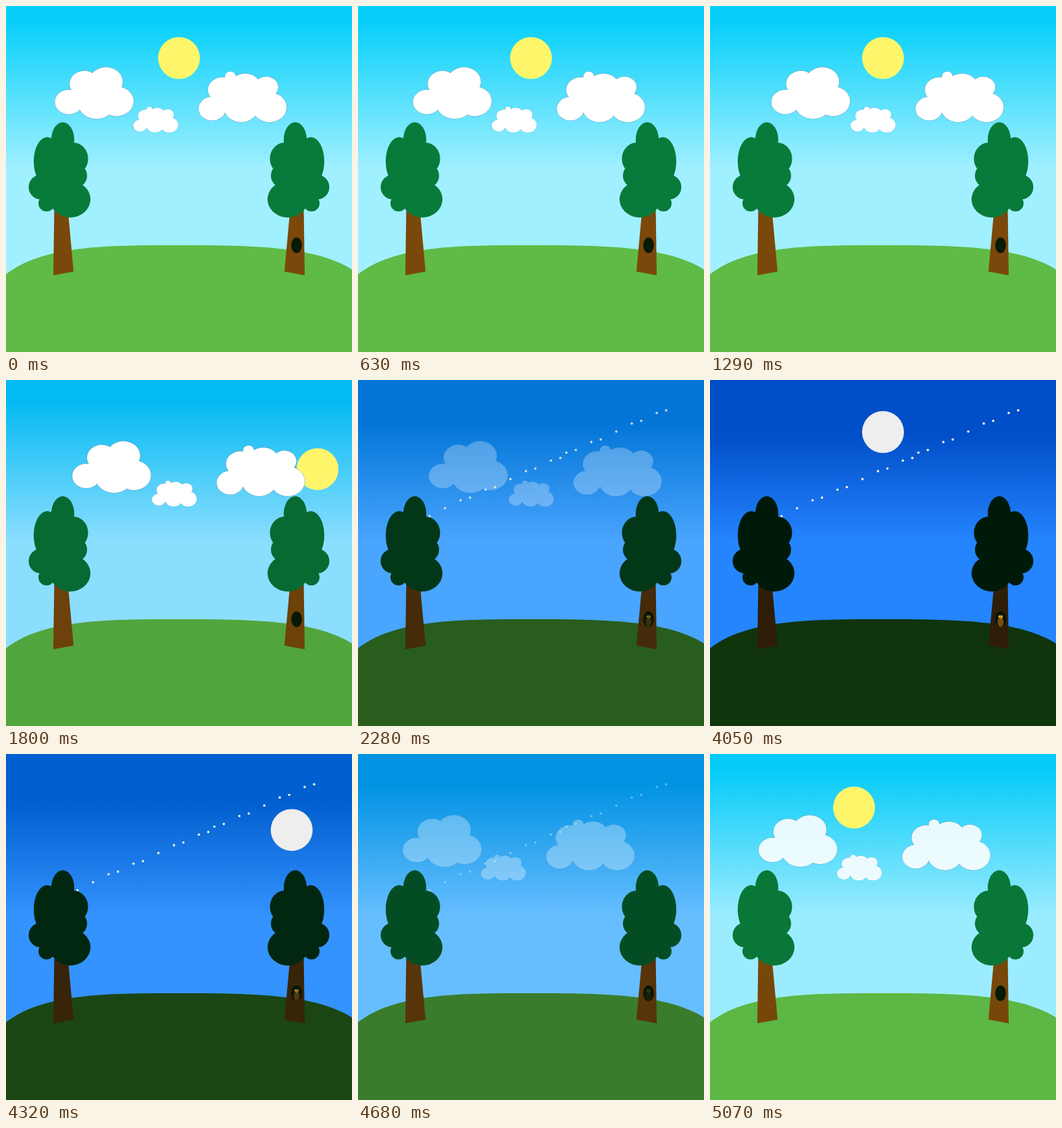
Animation of 512x512 px, one loop 5.1 s. Source, as an HTML page with a canvas:

```html
<!DOCTYPE html>
<html lang="en">
<head>
<meta charset="utf-8">
<title>Day and night</title>
<style>
  html, body { margin: 0; width: 100%; height: 100%; overflow: hidden; }
  canvas { display: block; width: 100%; height: 100%; }
</style>
</head>
<body>
<canvas id="stage" width="512" height="512"></canvas>
<script>
const LOOP = 5100, STEP = 30, SIZE = 512;
const DUSK = 1650, DAWN = 4200, TURN = 900;
const ctx = document.getElementById('stage').getContext('2d');

// Separate layer so outlined clouds fade as one picture
const layer = document.createElement('canvas');
layer.width = layer.height = SIZE;
const cloudCtx = layer.getContext('2d');

// [day, night]
const COLORS = {
  skyTop: ['05cffa', '004ec8'],
  skyLow: ['a0f0ff', '2585ff'],
  grass: ['5fbb46', '10340c'],
  leaves: ['087a3a', '001a0a'],
  trunk: ['7a480a', '2e1e08'],
  hole: ['081a05', '021406']
};

// Lobes run clockwise: x, y, radius x, radius y
const CROWN = [
  [84, 198, 17, 26], [99, 226, 22.5, 24], [102, 251, 18, 18], [95, 286, 30, 27],
  [60, 292, 12, 12], [51, 268, 17.5, 18], [61, 230, 20, 36]
];
// Cloud puffs: x, y, radius, all slightly wide
const puff = ([x, y, r]) => [x, y, r * 1.15, r];
const ROUND = [
  [93, 142, 18], [116, 115, 19], [148, 112, 21.5], [163.5, 141, 22], [134, 143, 24]
].map(puff);
const LONG = [
  [305, 152, 17.5], [320, 124, 18.5], [332, 104, 7], [354, 120, 20],
  [385, 120, 15.5], [390, 150, 22], [348, 150, 22]
].map(puff);

const ramp = (t, from, length) => Math.min(1, Math.max(0, (t - from) / length));
const frac = v => v - Math.floor(v);

function tint(name, night) {
  const channel = (hex, i) => parseInt(hex.substr(i * 2, 2), 16);
  const [day, dark] = COLORS[name];
  const mix = i => Math.round(channel(day, i) * (1 - night) + channel(dark, i) * night);
  return `rgb(${[0, 1, 2].map(mix)})`;
}

// Ellipses joined by the polygon through their centres
function lobes(c, list) {
  c.beginPath();
  for (const [x, y] of list) c.lineTo(x, y);
  c.closePath();
  for (const [x, y, rx, ry] of list) {
    c.moveTo(x + rx, y);
    c.ellipse(x, y, rx, ry, 0, 0, Math.PI * 2);
  }
}

function fillLobes(color, ...list) {
  ctx.fillStyle = color;
  lobes(ctx, list);
  ctx.fill();
}

function withAlpha(alpha, paint) {
  ctx.globalAlpha = alpha;
  paint();
  ctx.globalAlpha = 1;
}

function drawSky(night) {
  const g = ctx.createLinearGradient(0, 20 + 60 * night, 0, 240);
  g.addColorStop(0, tint('skyTop', night));
  g.addColorStop(1, tint('skyLow', night));
  ctx.fillStyle = g;
  ctx.fillRect(0, 0, SIZE, SIZE);
}

function drawOrb(angle, color) {
  fillLobes(color, [256 + 410 * Math.sin(angle), 487 - 410 * Math.cos(angle), 31, 31]);
}

function drawCloud(shape, x, y, scale) {
  const c = cloudCtx;
  c.save();
  c.translate(x, y);
  c.scale(scale, scale);
  lobes(c, shape);
  c.stroke();
  c.fill();
  c.restore();
}

function drawClouds(t, alpha) {
  const time = t < DAWN ? t : t - LOOP;
  cloudCtx.clearRect(0, 0, SIZE, SIZE);
  cloudCtx.fillStyle = '#fff';
  cloudCtx.strokeStyle = '#6f8fa8';
  cloudCtx.lineWidth = 0.9;
  drawCloud(ROUND, time * 0.0143, 0, 1);
  drawCloud(LONG, time * 0.0149, 0, 1);
  drawCloud(LONG, 43 + time * 0.0153, 99.5, 0.51);
  withAlpha(alpha, () => ctx.drawImage(layer, 0, 0));
}

// Golden-ratio steps scatter the stars evenly
function drawStars() {
  for (let i = 1; i <= 22; i++) {
    fillLobes('#f4f6e4', [55 + 410 * frac(i * 0.618), 37 + 184 * frac(i * 0.383), 1.8, 1.8]);
  }
}

function drawHill(night) {
  ctx.fillStyle = tint('grass', night);
  ctx.beginPath();
  ctx.moveTo(0, 397);
  ctx.bezierCurveTo(55, 354, 150, 354, 256, 354);
  ctx.bezierCurveTo(362, 354, 457, 355, 512, 390);
  ctx.lineTo(SIZE, SIZE);
  ctx.lineTo(0, SIZE);
  ctx.fill();
}

function drawTree(night, side) {
  ctx.save();
  ctx.translate(256, 0);
  ctx.scale(side, 1);
  ctx.translate(-256, 0);
  ctx.fillStyle = tint('trunk', night);
  ctx.beginPath();
  ctx.moveTo(71.5, 295);
  ctx.lineTo(91, 295);
  ctx.lineTo(100, 393);
  ctx.lineTo(70, 398.5);
  ctx.fill();
  fillLobes(tint('leaves', night), ...CROWN);
  ctx.restore();
}

function drawOwl() {
  fillLobes('#7d4a14', [430, 351, 3.5, 3.5], [430, 358, 4.5, 7.5]);
  fillLobes('#f2c21c', [428.3, 350, 1.4, 1.4], [431.7, 350, 1.4, 1.4]);
  fillLobes('#e8a317', [430, 352, 0.9, 1.8]);
}

function draw(t) {
  const dusk = ramp(t, DUSK, TURN), dawn = ramp(t, DAWN, TURN);
  const night = dusk - dawn;
  const angle = Math.PI * (dusk + dawn);
  drawSky(night);
  drawOrb(angle, '#fff56b');
  drawOrb(angle - Math.PI, '#eeeeee');
  drawClouds(t, 1 - ramp(t, 1800, 660) + ramp(t, 4470, 680));
  withAlpha(ramp(t, 1800, 600) - ramp(t, 4300, 600), drawStars);
  drawHill(night);
  drawTree(night, 1);
  drawTree(night, -1);
  fillLobes(tint('hole', night), [430, 354, 8, 11.5]);
  withAlpha(ramp(t, 1950, 750) - ramp(t, 4050, 750), drawOwl);
}

const start = performance.now();
function tick() {
  const t = (performance.now() - start) % LOOP;
  draw(Math.floor(t / STEP) * STEP);
  requestAnimationFrame(tick);
}
tick();
</script>
</body>
</html>
```
